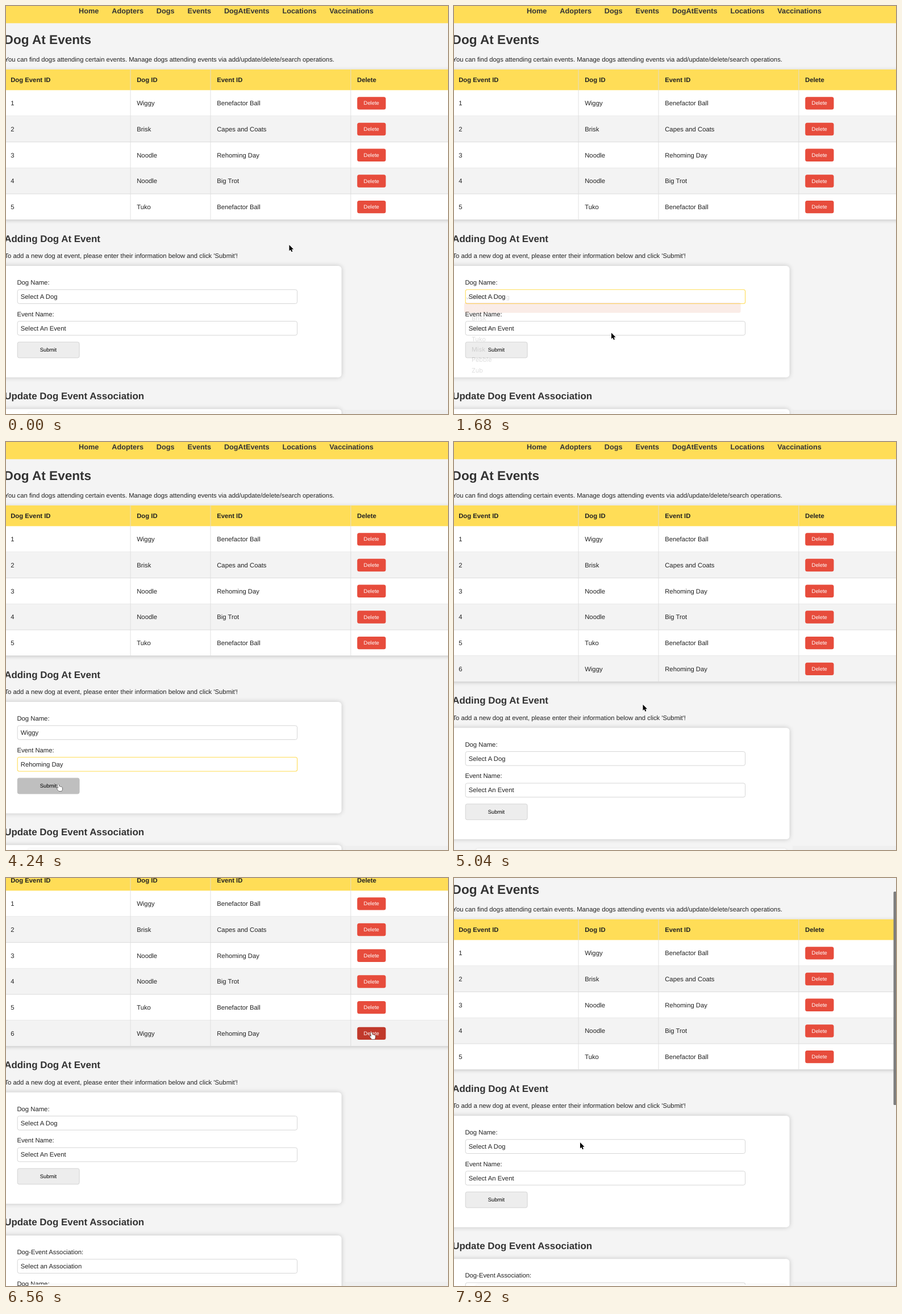
Animation of 778 by 719 pixels, one loop 8 s. Source, as an HTML page with a canvas:

```html
<!DOCTYPE html>
<html lang="en">
<head>
<meta charset="utf-8">
<title>Dog At Events</title>
<style>
html, body { margin: 0; width: 100%; height: 100%; overflow: hidden; background: #f4f4f4; }
canvas { display: block; }
</style>
</head>
<body>
<canvas id="stage" width="778" height="719"></canvas>
<script>
const ctx = document.getElementById('stage').getContext('2d');
const LOOP = 8000, STEP = 80, ROW = 45.7, ITEM = 18.4;
const YELLOW = '#ffdd57', INK = '#222', HEAD = '#333';
const SANS = '"Liberation Sans", Arial, sans-serif';
const MENU = 'Inter, sans-serif';

const dogs = ['Select A Dog', 'Wiggy', 'Brisk', 'Noodle', 'Tuko', 'Misk', 'Pebble', 'Zub'];
const events = ['Select An Event', 'Capes and Coats', 'Rehoming Day', 'Big Trot', 'Benefactor Ball'];
const bookings = [[1, 4], [2, 1], [3, 2], [3, 3], [4, 4], [1, 2]];
const nav = ['Home', 'Adopters', 'Dogs', 'Events', 'DogAtEvents', 'Locations', 'Vaccinations'];

// time, x, y of the pointer tip
const pointer = [
  [0, 498.5, 421], [560, 300, 511], [800, 292, 512], [1120, 284, 531], [1520, 283, 532],
  [1680, 277, 576], [1840, 255, 568], [2000, 230, 570], [2480, 122, 604], [3600, 122, 604],
  [4160, 92, 603], [4640, 92, 603], [5200, 392, 428], [5760, 392, 428], [6480, 643, 272],
  [6800, 643, 272], [7280, 422, 211], [7440, 422, 211], [7920, 222, 466]
];
const scrolling = [[5280, 0], [5440, 108], [5600, 126], [7120, 126], [7360, 82], [7920, 39]];

const menus = [
  { items: dogs, pick: 1, top: 500.5, open: 640, close: 1600 },
  { items: events, pick: 2, top: 556, open: 1920, close: 3520 }
];
const RELOAD = 4640, REMOVED = 6800;

function track(keys, t, smooth) {
  if (t <= keys[0][0]) return keys[0].slice(1);
  for (let i = 1; i < keys.length; i++) {
    const a = keys[i - 1], b = keys[i];
    if (t > b[0]) continue;
    let u = (t - a[0]) / (b[0] - a[0]);
    if (smooth) u = u * u * (3 - 2 * u);
    return a.slice(1).map((v, j) => v + (b[j + 1] - v) * u);
  }
  return keys[keys.length - 1].slice(1);
}

function text(s, x, y, size = 11.3, color = INK, weight = 400, family = SANS) {
  ctx.font = `${weight} ${size}px ${family}`;
  ctx.fillStyle = color;
  ctx.fillText(s, x, y);
  return ctx.measureText(s).width;
}

function rect(x, y, w, h, fill) {
  ctx.fillStyle = fill;
  ctx.fillRect(x, y, w, h);
}

function box(x, y, w, h, r, fill, stroke, line = 0.8) {
  ctx.beginPath();
  ctx.roundRect(x, y, w, h, r);
  ctx.fillStyle = fill;
  ctx.fill();
  if (!stroke) return;
  ctx.strokeStyle = stroke;
  ctx.lineWidth = line;
  ctx.stroke();
}

function shadowed(color, blur, dy, paint) {
  ctx.save();
  ctx.shadowColor = color;
  ctx.shadowBlur = blur;
  ctx.shadowOffsetY = dy;
  paint();
  ctx.restore();
}

function drawTable(count, over) {
  const bottom = 148.3 + count * ROW;
  shadowed('rgba(0,0,0,.22)', 7, 1, () => rect(-4, 111.8, 790, bottom - 111.8, '#fff'));
  rect(-4, 111.8, 790, 36.5, YELLOW);
  ['Dog Event ID', 'Dog ID', 'Event ID', 'Delete'].forEach((s, i) =>
    text(s, [8.2, 230.2, 371.2, 618][i], 134, 11.3, INK, 700));
  for (let i = 0; i < count; i++) {
    const top = 148.3 + i * ROW, mid = top + ROW / 2;
    if (i % 2) rect(-4, top, 790, ROW, '#f3f3f3');
    rect(-4, top + ROW - 0.5, 790, 0.9, '#d9d9d9');
    text(i + 1, 8.2, mid + 4);
    text(dogs[bookings[i][0]], 230.2, mid + 4);
    text(events[bookings[i][1]], 371.2, mid + 4);
    box(618.2, mid - 11, 50.3, 22.4, 3.5, over(618, mid - 11, 50, 22) ? '#c0392b' : '#e74c3c');
    text('Delete', 629.6, mid + 3.3, 9.41, '#fff');
  }
  for (const x of [218.6, 359.6, 606.4]) rect(x, 111.8, 0.9, bottom - 111.8, '#ddd');
}

function drawCard(top, height) {
  shadowed('rgba(0,0,0,.2)', 8, 0, () => box(-12, top, 602.6, height, 5.6, '#fff'));
}

function drawField(label, value, y, focused) {
  text(label, 19.4, y + 4);
  box(20.2, y + 12.8, 492.4, 24.7, 3.3, '#fff', focused ? YELLOW : '#ccc', focused ? 1.1 : 0.8);
  text(value, 25.8, y + 29);
}

function drawPage(t, count, over) {
  rect(0, -5, 778, 35.3, YELLOW);
  let x = 128.1;
  for (const s of nav) x += text(s, x, 12.8, 12.7, HEAD, 700) + 22.9;
  text('Dog At Events', -3.4, 66.8, 22.6, HEAD, 700);
  text('You can find dogs attending certain events. Manage dogs attending events via add/update/delete/search operations.', -2.6, 97.5);
  drawTable(count, over);

  const shift = (count - 5) * ROW;
  ctx.translate(0, shift);
  text('Adding Dog At Event', -2.8, 415.5, 16.95, HEAD, 700);
  text("To add a new dog at event, please enter their information below and click 'Submit'!", -2.6, 443.8);
  drawCard(458, 196.4);
  menus.forEach((m, i) => {
    const chosen = t >= m.close + 160 && t < RELOAD;
    const next = i ? RELOAD : menus[1].open;
    drawField(['Dog Name:', 'Event Name:'][i], m.items[chosen ? m.pick : 0],
      487 + i * 55.7, t >= m.open && t < next);
  });
  const hot = over(20, 592 + shift, 110, 28);
  box(20.2, 592.2, 108.9, 27.8, 3, hot ? '#bfbfbf' : '#ededed', hot ? '#bfbfbf' : '#ccc');
  text('Submit', 59.8, 609, 9.41, '#000');

  text('Update Dog Event Association', -2.8, 692.5, 16.95, HEAD, 700);
  drawCard(710.3, 300);
  drawField('Dog-Event Association:', 'Select an Association', 739.3);
  drawField('Dog Name:', dogs[0], 795);
}

function drawMenu(m, t, y) {
  if (t < m.open || t >= m.close + 160) return;
  const fade = t < m.close ? 1 : t < m.close + 80 ? 0.5 : 0.15;
  const h = m.items.length * ITEM + 7.4, first = m.top + 3.5;
  ctx.save();
  // the panel clears faster than its items
  ctx.globalAlpha = fade ** 3;
  shadowed('rgba(0,0,0,.34)', 9, 2, () => box(13.7, m.top, 494.8, h, 4, '#e7e5e2'));
  box(13.7, m.top, 494.8, h, 4, '#e7e5e2', '#b5b3b0', 0.7);
  ctx.globalAlpha = fade;
  const active = t < m.close ? Math.floor((y - first) / ITEM) : m.pick;
  m.items.forEach((s, i) => {
    const top = first + i * ITEM, color = i === active ? '#fff' : INK;
    if (i === active) box(18, top, 486.6, ITEM, 3.2, '#d98060');
    text(s, 31, top + 13, 10.9, color, 400, MENU);
    if (i) return;
    ctx.beginPath();
    ctx.moveTo(21.8, top + 9.6);
    ctx.lineTo(24, top + 12.5);
    ctx.lineTo(27.8, top + 6);
    ctx.strokeStyle = color;
    ctx.lineWidth = 1.2;
    ctx.stroke();
  });
  ctx.restore();
}

const arrow = new Path2D('M0 0V10.6L2.4 8.4 4.1 12.2 5.9 11.4 4.3 7.7H7.6Z');
const hand = new Path2D('M-1.2.8Q0-.6 1 .8L1.8 4.3Q3 3.4 3.8 4.6 5 4 5.7 5.2 7.2 5 7.3 6.6L7.1 9.4 6 12.2H.9L-2.4 8Q-3.4 6.4-2 6.2L-.2 7.4Z');

function drawPointer(x, y, overButton) {
  ctx.save();
  ctx.translate(x, y);
  ctx.lineJoin = 'round';
  const shape = overButton ? hand : arrow;
  ctx.lineWidth = overButton ? 1 : 1.6;
  ctx.strokeStyle = overButton ? '#111' : '#fff';
  ctx.fillStyle = overButton ? '#fff' : '#000';
  ctx.stroke(shape);
  ctx.fill(shape);
  ctx.restore();
}

function drawScrollbar(t, scroll, count) {
  const alpha = t < 5360 ? 0 : t < 6160 ? 1 : t < 6400 ? (6400 - t) / 240 : t > 7120 ? 1 : 0;
  if (!alpha) return;
  ctx.save();
  ctx.globalAlpha = alpha;
  const more = count > 5;
  box(773.6, 3.1 + scroll * (more ? 0.508 : 0.535), 6, more ? 364 : 376, 1.5, '#7d7d7d');
  ctx.restore();
}

function draw(t) {
  const [x, y] = track(pointer, t, true);
  const [scroll] = track(scrolling, t);
  const count = t >= RELOAD && t < REMOVED ? 6 : 5;
  let overButton = false;
  const over = (bx, by, w, h) => {
    const hit = x >= bx && x <= bx + w && y + scroll >= by && y + scroll <= by + h
      && !menus.some(m => t >= m.open && t < m.close + 160);
    overButton = overButton || hit;
    return hit;
  };
  rect(0, 0, 778, 719, '#f4f4f4');
  ctx.save();
  ctx.translate(0, -scroll);
  drawPage(t, count, over);
  ctx.restore();
  rect(596, 711.5, 182, 8, 'rgba(0,0,0,.02)');
  shadowed('rgba(0,0,0,.08)', 4, 0, () => box(38, 716.5, 548, 12, 5, '#fdfdfd'));
  drawScrollbar(t, scroll, count);
  menus.forEach(m => drawMenu(m, t, y));
  drawPointer(x, y, overButton);
}

ctx.textRendering = 'geometricPrecision';
ctx.fontKerning = 'normal';
const start = performance.now();
function tick() {
  const t = (performance.now() - start) % LOOP;
  draw(Math.floor(t / STEP) * STEP);
  requestAnimationFrame(tick);
}
tick();
</script>
</body>
</html>
```
